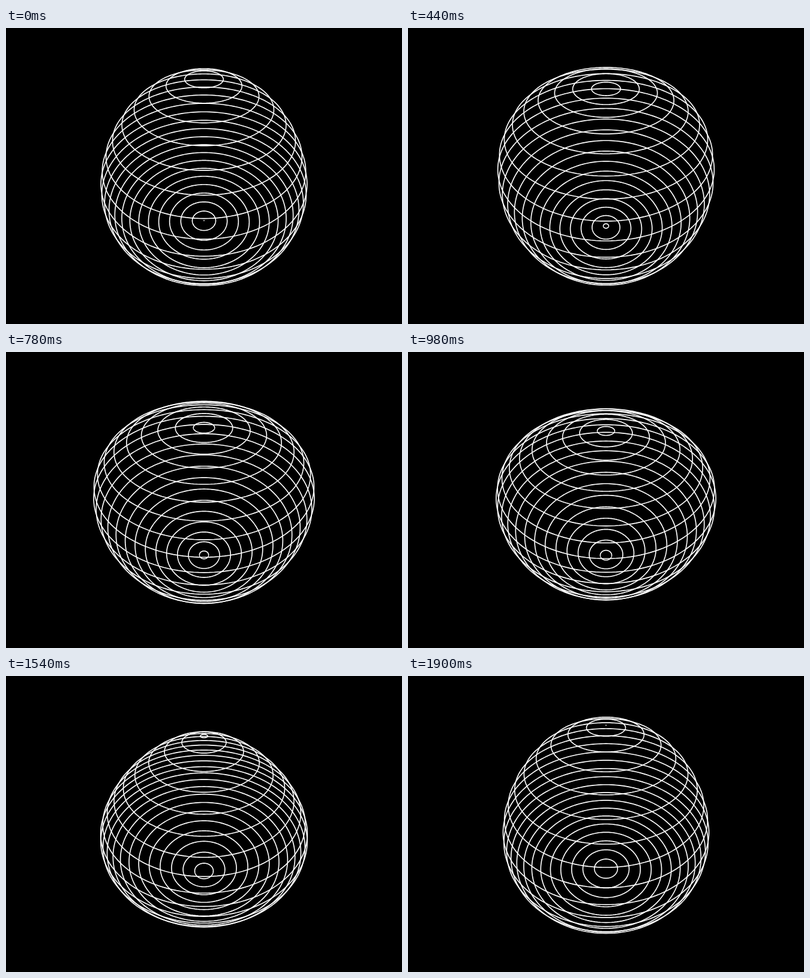
Write an HTML page with a canvas that moves like this. It is 660 by 495 pixels and loops after 1920 ms.

```html
<!DOCTYPE html>
<html lang="en">
<head>
<meta charset="utf-8">
<title>Breathing ring sphere</title>
<style>
html, body { margin: 0; width: 100%; height: 100%; overflow: hidden; background: #000; }
canvas { display: block; }
</style>
</head>
<body>
<canvas id="stage" width="660" height="495"></canvas>
<script>
const ctx = document.getElementById('stage').getContext('2d');
const LOOP = 1920, RINGS = 22, STEPS = 180, TAU = Math.PI * 2;
const LEAD = 10;                          // each 20 ms step shows its midpoint
const SCALE = 0.825;                      // 800 x 600 scene units to stage pixels
const CENTER_X = 330, CENTER_Y = 247;
const EYE = 300 / Math.tan(Math.PI / 6);  // camera distance, 60 degree view
const TILT = Math.SQRT1_2;                // sine and cosine of 45 degrees
const RADIUS = 200, HEIGHT = 180, WAVE = 24;

// Perspective projection of a point after tilting the vertical axis towards the viewer.
function project(x, y, z) {
  const k = EYE / (EYE - TILT * (y + z));
  return [x * k, -TILT * (y - z) * k];
}

function ring(r, y) {
  ctx.beginPath();
  for (let i = 0; i < STEPS; i++) {
    const a = i / STEPS * TAU;
    ctx.lineTo(...project(r * Math.cos(a), y, r * Math.sin(a)));
  }
  ctx.closePath();
  ctx.stroke();
}

function draw() {
  const t = (performance.now() + LEAD) % LOOP / LOOP;
  ctx.setTransform(1, 0, 0, 1, 0, 0);
  ctx.fillStyle = '#000';
  ctx.fillRect(0, 0, 660, 495);
  ctx.setTransform(SCALE, 0, 0, SCALE, CENTER_X, CENTER_Y);
  ctx.strokeStyle = '#fff';
  ctx.lineWidth = 2;
  ctx.lineJoin = 'round';
  // Rings climb one step per loop while a vertical wave runs over them.
  for (let i = 0; i < RINGS; i++) {
    const angle = (i + t) / RINGS * Math.PI;
    const lift = WAVE * Math.cos(TAU * t + 2 * angle);
    ring(RADIUS * Math.sin(angle), lift - HEIGHT * Math.cos(angle));
  }
  requestAnimationFrame(draw);
}
draw();
</script>
</body>
</html>
```
